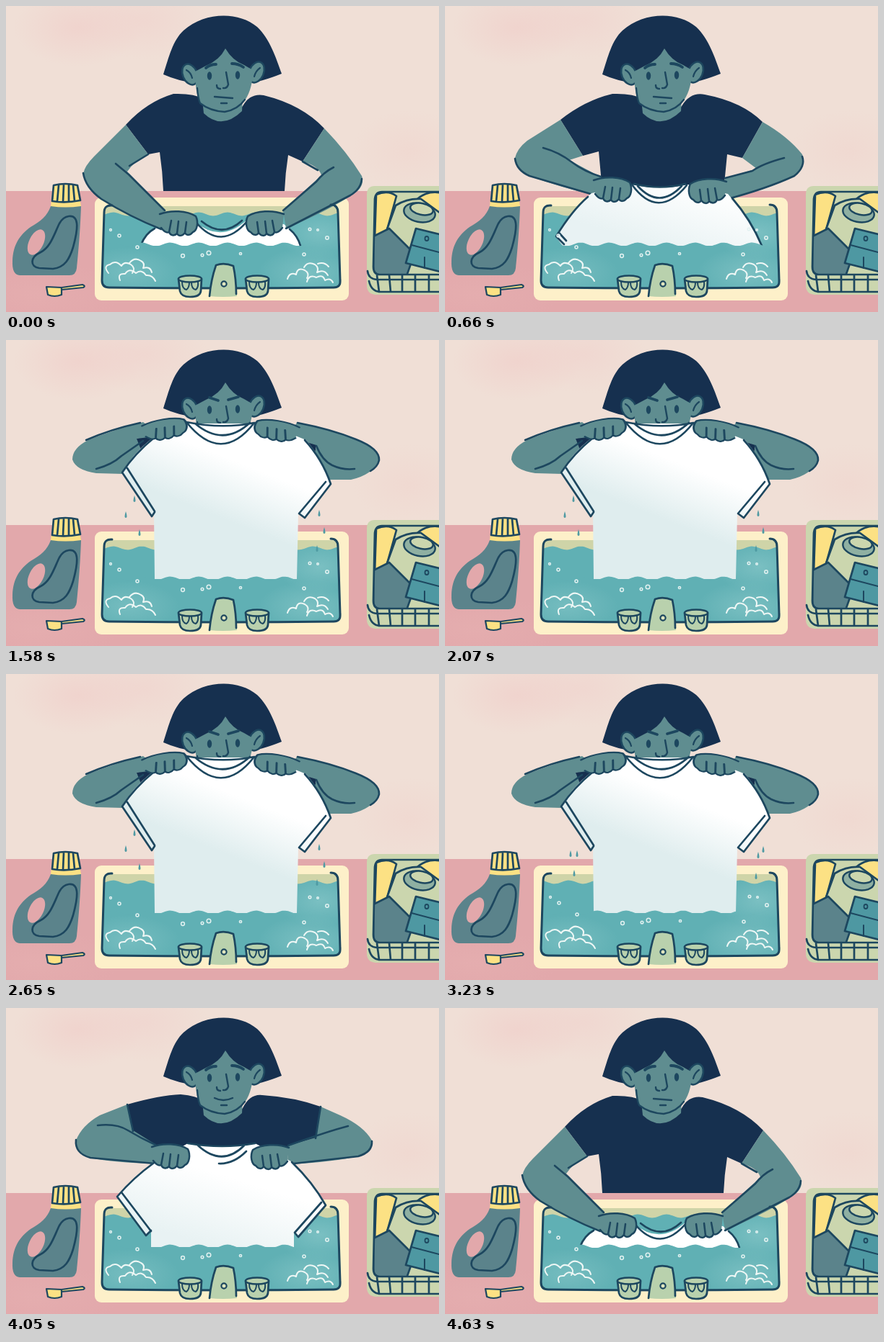
Animation, 600 px wide and 425 px high, one loop 4.96 s. Source, as an HTML page with a canvas:

```html
<!DOCTYPE html>
<html lang="en">
<head>
<meta charset="utf-8">
<title>Hand wash</title>
<style>
html, body { margin: 0; width: 100%; height: 100%; overflow: hidden; background: #f0dfd6; }
canvas { display: block; width: 600px; height: 425px; }
</style>
</head>
<body>
<canvas id="stage" width="600" height="425"></canvas>
<script>
const ctx = document.getElementById('stage').getContext('2d');
const LOOP = 4960;
const INK = '#1d475f', NAVY = '#16304f', SKIN = '#5f8d90', WATER = '#60b0b4';
const CREAM = '#fdf0c9', SAGE = '#cbd6ae', GREEN = '#b9d1ad', YELLOW = '#fce184', ROSE = '#e2a8ab', SLATE = '#5b838b';

function shape(d, fill, line, width = 2.7) {
  const p = new Path2D(d);
  if (fill) { ctx.fillStyle = fill; ctx.fill(p); }
  if (line) { ctx.strokeStyle = line; ctx.lineWidth = width; ctx.stroke(p); }
}
const ink = (d, width) => shape(d, null, INK, width);

function oval(x, y, rx, ry, fill, line, rot = 0, width = 2.5) {
  ctx.beginPath();
  ctx.ellipse(x, y, rx, ry, rot, 0, 7);
  if (fill) { ctx.fillStyle = fill; ctx.fill(); }
  if (line) { ctx.strokeStyle = line; ctx.lineWidth = width; ctx.stroke(); }
}

function glow(x, y, r, rgb, alpha, squash = 1) {
  ctx.save();
  ctx.translate(x, y);
  ctx.scale(1, squash);
  const g = ctx.createRadialGradient(0, 0, 0, 0, 0, r);
  g.addColorStop(0, `rgba(${rgb},${alpha})`);
  g.addColorStop(1, `rgba(${rgb},0)`);
  ctx.fillStyle = g;
  ctx.fillRect(-r, -r, 2 * r, 2 * r);
  ctx.restore();
}

function fade(x0, y0, x1, y1, end) {
  const g = ctx.createLinearGradient(x0, y0, x1, y1);
  g.addColorStop(0, '#ffffff');
  g.addColorStop(1, end);
  return g;
}

function room() {
  ctx.fillStyle = '#f0dfd6';
  ctx.fillRect(0, 0, 600, 425);
  glow(100, 30, 90, '240,200,197', .5, .6);
  glow(190, 20, 90, '240,203,200', .4, .6);
  glow(560, 200, 80, '240,203,198', .3, .7);
  ctx.fillStyle = ROSE;
  ctx.fillRect(0, 257, 600, 168);
  glow(40, 400, 120, '231,178,178', .5, .4);
}

function bottle() {
  shape('M62 278H104C103 310 100 345 98 364Q97 374 88 374H19Q8 373 9 354C10 331 19 318 34 307C48 299 57 292 62 278Z', SLATE);
  oval(42, 328, 10, 19, ROSE, null, .45);
  ink('M87 292C103 290 99 313 93 335C88 351 82 363 65 365L46 364C33 362 33 349 48 342C62 335 67 316 74 302Q79 293 87 292Z');
  shape('M65 249Q82 245 99 249L104 278Q82 281 62 278Z', YELLOW);
  ink('M64 271L66 249Q82 245 99 249L103 270Q82 274 64 271M73 249L71 271M80 248L79 272M87 248V272M93 249L95 271', 2.7);
}

function scoop() {
  shape('M56 390L77 391V401Q67 405 58 401Z', YELLOW, INK, 2.2);
  shape('M77 391L106 387Q111 389 107 391L77 394Z', YELLOW, INK, 2.2);
}

function basket() {
  shape('M511 250H600V401H512Q500 400 500 388V262Q500 250 511 250Z', SAGE);
  ctx.save();
  ctx.clip(new Path2D('M520 258H600V373H517Q509 372 509 362L511 268Q512 258 520 258Z'));
  shape('M513 262Q530 255 541 264L526 318L511 322Z', YELLOW, INK);
  shape('M570 268Q585 255 605 260V300L580 276Z', YELLOW, INK);
  shape('M540 277Q556 267 575 268L605 290V350H525L528 310Z', SAGE, INK);
  oval(573, 287, 22, 13, '#8fb0a2', INK, .2);
  oval(576, 282, 16, 8, SAGE, INK, .2);
  shape('M509 320L531 309L566 344L555 375H509Z', SLATE, INK);
  shape('M568 309L605 318V370L554 357Z', '#4e98a2', INK);
  ink('M562 332L600 342M580 349V364', 2);
  oval(583, 323, 2.5, 3, null, INK, 0, 1.8);
  ctx.restore();
  ink('M600 258H521Q512 258 511 268L509 362Q509 373 518 373H600');
  ink('M501 368Q502 379 514 380H600M503 382Q506 396 518 397H600M514 374L517 397M531 374L533 397M549 374V397M567 374V397M586 374V397');
}

function sink() {
  ctx.beginPath();
  ctx.roundRect(123, 266, 352, 143, 9);
  ctx.fillStyle = CREAM;
  ctx.fill();
  shape('M145 278H451Q460 278 460 287L463 384Q463 391 456 391H141Q134 391 134 384L136 287Q137 278 145 278Z', '#cfd4a8');
}

function waterArea(top, x0, x1, phase) {
  ctx.beginPath();
  ctx.moveTo(x0, 391);
  for (let x = x0; x <= x1; x += 2) ctx.lineTo(x, top + 2.4 * Math.sin(x / 6.3 + phase));
  ctx.lineTo(x1, 391);
  ctx.closePath();
}

function water(top, alt) {
  ctx.save();
  ctx.clip(new Path2D('M136 277H460L463 384Q463 391 456 391H141Q134 391 134 384Z'));
  waterArea(top, 133, 465, alt ? 2.6 : 0);
  ctx.clip();
  ctx.fillStyle = WATER;
  ctx.fillRect(133, 270, 332, 122);
  glow(435, 315, 60, '140,202,203', .6, .6);
  glow(170, 370, 70, '140,202,203', .5, .5);
  glow(420, 370, 70, '140,202,203', .6, .5);
  ctx.restore();
}

function sinkLine() {
  ink('M147 277Q136 276 136 287L133 381Q133 391 143 391Q300 393 454 391Q464 391 463 381L460 287Q460 276 450 276', 3);
}

function foam(alt) {
  ctx.save();
  if (alt) ctx.translate(1, -1);
  const white = d => shape(d, null, '#eef7f5', 2);
  white('M142 371Q134 361 144 359Q152 352 160 361Q164 354 173 359Q180 364 175 371M171 357Q178 348 187 354Q193 357 190 364Q200 361 202 370M158 381Q154 371 165 372Q171 363 180 371Q188 365 194 374Q203 373 207 382');
  white('M390 379Q393 369 402 373Q404 362 414 367Q421 371 417 378M413 363Q418 354 428 359Q434 363 431 370Q441 365 446 374M417 383Q420 372 430 377Q439 372 442 381Q450 377 453 384M432 358Q441 355 447 362');
  const dots = [[157, 319, 2], [145, 311, 1.4], [182, 335, 2], [245, 347, 2.4], [272, 346, 1.8], [281, 343, 2.8],
    [325, 344, 1.6], [413, 345, 2], [421, 310, 1.8], [445, 322, 2.2], [432, 311, 1.3]];
  for (const [x, y, r] of dots) oval(x, y, r, r, null, '#e3f2f1', 0, 1.5);
  ctx.restore();
}

function taps() {
  for (const x of [255, 348]) {
    shape(`M${x - 16} 379L${x - 14} 396Q${x - 12} 404 ${x} 404Q${x + 14} 404 ${x + 15} 396L${x + 16} 379Z`, GREEN, INK);
    oval(x, 379, 16, 4.5, GREEN, INK);
    ink(`M${x - 11} 383Q${x - 11} 393 ${x - 5} 394Q${x - 1} 391 ${x - 1} 384M${x + 2} 384Q${x + 2} 393 ${x + 8} 394Q${x + 12} 391 ${x + 11} 383`, 2);
  }
  shape('M291 360Q302 356 315 360Q320 382 320 403Q300 405 282 403Q284 380 291 360Z', GREEN);
  ink('M282 403Q284 380 291 360Q302 356 315 361Q319 380 319 400');
  oval(302, 386, 3.6, 3.6, '#dfe5be', INK, 0, 2.2);
}

function head(pose) {
  shape('M218 95C226 70 231 48 246 34C275 8 322 7 348 29C366 46 374 72 382 94Q352 106 335 107H262Q238 104 218 95Z', NAVY);
  shape('M272 130L274 149Q299 173 327 146L328 125Z', SKIN);
  oval(255, 95, 10, 15, SKIN, INK, -.4);
  oval(347, 92, 10, 15, SKIN, INK, .4);
  shape('M262 91L277 83Q296 75 304 59Q314 76 330 82L342 89C342 105 339 119 331 131Q320 146 303 147Q282 146 269 135Q262 120 262 91Z', SKIN);
  ink('M265 114Q266 128 269 135Q283 146 303 147Q321 144 331 130', 2.3);
  ink('M250 89Q256 92 258 100M352 86Q346 90 344 98', 2.2);
  oval(282, 97, 3.2, 5.8, INK);
  oval(321, 96, 3.2, 5.8, INK);
  ink(pose === 3 ? 'M282 80L294 84M308 83L322 79' : 'M277 86Q283 81 291 81M313 80Q322 80 329 85', 3.8);
  ink('M305 92L308 109Q306 115 301 114M292 110Q292 115 297 115', 2.4);
  ink(pose === 2 ? 'M289 125Q301 131 314 125M298 135H306' : 'M289 126L314 128M298 135H306', 2.4);
}

const collar = 'Q299 173 328 139';
const poses = [
  {
    torso: `M274 129${collar}Q338 121 357 124Q410 137 441 170L411 216L391 207Q387 232 386 257H218Q217 230 213 203L197 206L166 165Q195 133 232 122Q260 121 274 129Z`,
    arms: 'M166 165L197 206Q178 215 168 230L220 283L215 309Q160 288 130 267Q110 252 107 233Q109 222 122 209ZM441 170L411 216Q433 222 437 235L384 284L388 309Q450 283 486 258Q497 248 493 236Q472 202 441 170Z',
    lines: 'M152 219L170 234L220 284M197 206L171 222M107 232Q110 252 132 268Q172 293 215 310M454 224Q440 231 430 244L384 284M411 216L432 228M493 240Q492 254 477 263L388 309',
    shirt: 'M187 333C194 313 211 304 228 303L262 300Q298 330 334 297L385 303Q402 314 408 333Z',
    trim: 'M187 332Q193 316 206 309M393 310Q404 319 408 333M263 300Q298 342 335 298M271 299Q300 323 327 298',
    hands: [213, 286, 385, 286, 1, 1, 0]
  },
  {
    torso: `M274 129${collar}Q340 119 360 123Q412 133 440 161L412 211L391 206L386 257H218L213 202L191 208L160 158Q194 131 232 122Q260 121 274 129Z`,
    arms: 'M160 158L191 208L172 214L215 237L212 264Q160 252 117 236Q97 226 97 211Q100 198 114 187ZM440 161L412 211L432 226L388 239L386 269Q455 253 488 234Q500 222 495 206Q475 181 440 161Z',
    lines: 'M136 197Q158 203 176 217Q193 230 216 237M97 212Q99 228 117 236L212 264M470 211Q440 219 426 229L388 239M495 209Q500 223 484 236Q445 254 388 269',
    shirt: 'M258 248Q298 256 337 248L392 261Q420 292 438 333H163L153 320Q176 282 203 260Z',
    trim: 'M198 265Q176 284 154 320L165 331M158 315L168 326M398 267Q424 297 439 333M259 248Q295 298 335 249M267 250Q297 283 328 250M262 247Q298 256 333 247',
    hands: [206, 239, 390, 241, 1, 1, 0]
  },
  {
    torso: `M274 129${collar}Q338 119 355 121Q400 124 436 137L427 200H178L168 134Q213 121 242 120Q264 122 274 129Z`,
    arms: 'M168 134L176 170L208 190L207 216Q150 215 117 208Q96 200 97 184Q105 163 130 149ZM436 137L429 180L391 191L390 217Q455 214 491 205Q508 198 507 184Q496 164 463 149Z',
    lines: 'M127 163Q153 160 169 170Q187 181 207 190M168 134L176 171M97 183Q95 202 117 208L206 216M474 164Q447 171 391 191M436 137L429 181M507 185Q508 200 488 206L390 217',
    shirt: 'M252 188Q300 196 345 188L395 213Q426 242 443 274L405 318L399 311V332H201V309L194 316L154 262Q175 234 205 214Z',
    trim: 'M205 215Q176 236 154 262L194 316L201 309M160 256L201 310M396 214Q425 242 443 274L405 318L400 312M437 270L400 312M252 188Q300 196 345 188M265 190Q299 222 330 191M295 216Q315 217 333 199',
    hands: [202, 190, 392, 191, 1, 1, 0]
  },
  {
    torso: 'M180 137L218 128H385L430 145L428 160H188Z',
    arms: 'M190 114Q145 126 114 139Q92 150 92 166Q97 181 125 185L163 186L187 152L181 137L215 133ZM403 115Q450 125 485 138Q515 149 517 166Q509 187 478 194L446 194L428 158L430 146L390 134Z',
    lines: 'M111 139Q145 124 186 115M125 179Q147 173 160 161L190 140M404 115Q451 124 485 138Q518 151 517 167Q515 176 505 182M430 147Q438 167 452 174Q467 181 483 179',
    shirt: 'M247 116Q300 116 359 116L416 139Q438 164 450 200L414 247L405 241L403 332H206L205 240L202 246L161 184Q176 157 203 136Z',
    trim: 'M206 135Q178 158 161 184L202 245L206 239M168 178L206 238M414 139Q438 165 450 200L414 247L406 241M443 197L406 241M250 114Q298 174 344 115M262 116Q301 149 338 115M250 114Q300 124 344 115M344 115L360 117',
    hands: [188, 117, 407, 119, 1.17, .82, -.2]
  }
];

function hand(x, y, flip, [sx, sy, tilt]) {
  ctx.save();
  ctx.translate(x, y);
  ctx.scale(flip, 1);
  ctx.rotate(tilt);
  ctx.scale(sx, sy);
  const d = 'M0 3C15 -3 38 -2 50 6C54 14 52 26 46 28C42 33 37 33 35 29C31 34 26 34 24 30C20 34 15 33 13 28C9 30 5 26 2 22';
  shape(d + 'Z', SKIN);
  ink(d + 'M35 29L37 14M24 30L26 13M13 28L16 12', 2.5);
  ctx.restore();
}

const dripSets = [
  [[178, 221], [166, 243], [185, 268], [434, 241], [441, 265], [431, 290]],
  [[174, 250], [183, 250], [179, 277], [434, 252], [441, 244], [431, 281]],
  [[180, 230], [168, 262], [185, 240], [437, 262], [428, 234], [417, 256]]
];

function drips(step) {
  for (const [x, y] of dripSets[step % 3])
    shape(`M${x} ${y - 5}Q${x + 3} ${y + 4} ${x} ${y + 4}Q${x - 3} ${y + 4} ${x} ${y - 5}Z`, '#4f9aa3');
}

function arms(p) {
  shape(p.arms, SKIN);
  ink(p.lines, 2.6);
}

function draw(pose, alt, step) {
  const p = poses[pose];
  ctx.lineCap = ctx.lineJoin = 'round';
  room();
  bottle();
  scoop();
  basket();
  sink();
  water(289, alt);
  shape(p.torso, NAVY);
  head(pose);
  if (pose) arms(p);
  shape(p.shirt, pose === 3 ? fade(310, 165, 280, 240, '#dfedee') : pose ? fade(310, 235, 280, 330, '#e8f2f3') : '#ffffff');
  ink(p.trim, 2.7);
  water(331, alt);
  if (!pose) arms(p);
  const [lx, ly, rx, ry, ...form] = p.hands;
  hand(lx, ly, 1, form);
  hand(rx, ry, -1, form);
  foam(alt);
  sinkLine();
  taps();
  if (pose === 3) drips(step);
}

const cues = [[0, 0], [660, 1], [830, 0], [1250, 1], [1410, 2], [1580, 3], [4050, 2], [4220, 1], [4380, 0]];
const start = performance.now();
let last = '';

function tick() {
  const t = (performance.now() - start) % LOOP;
  const pose = cues.findLast(c => t >= c[0])[1];
  const beat = t < 1000 ? Math.min(2, Math.floor(t / 330)) : Math.floor((t - 10) / 330);
  const step = pose === 3 ? Math.floor((t - 1575) / 165) : 0;
  const key = [pose, beat % 2, step].join();
  if (key !== last) {
    draw(pose, beat % 2, step);
    last = key;
  }
  requestAnimationFrame(tick);
}
tick();
</script>
</body>
</html>
```
